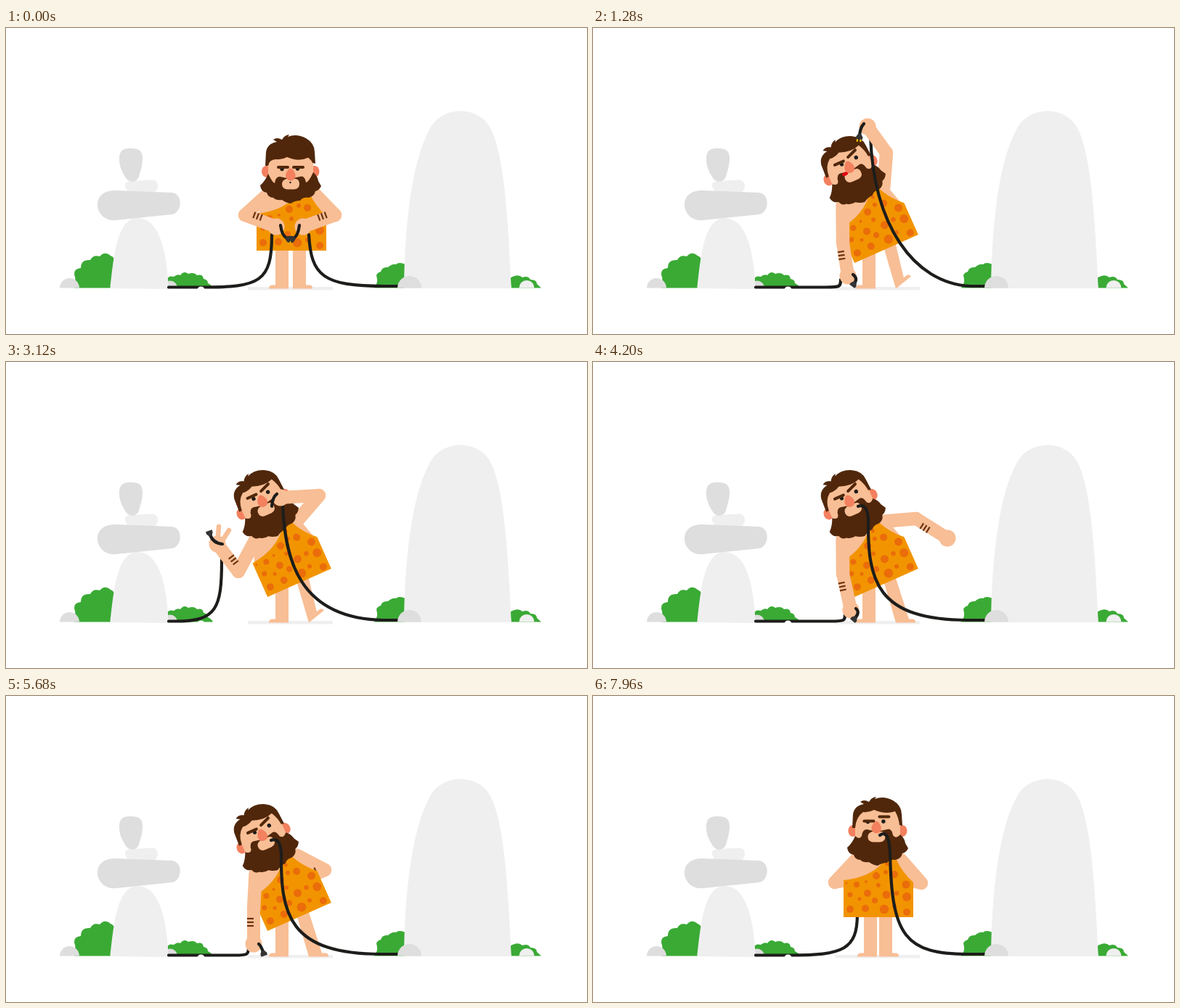
Recreate the animation shown at these times as an HTML page with a canvas. Size 800 by 422 pixels, loop 8000 ms.

```html
<!DOCTYPE html>
<html lang="en">
<head>
<meta charset="utf-8">
<title>Caveman with cables</title>
<style>
html, body { margin: 0; width: 100%; height: 100%; overflow: hidden; background: #fff; }
canvas { display: block; }
</style>
</head>
<body>
<canvas id="stage" width="800" height="422"></canvas>
<script>
const ctx = document.getElementById('stage').getContext('2d');
const SKIN = '#f8be95', HAIR = '#50270b', RED = '#f3805f', BLACK = '#1d1d1b', GREEN = '#3aaa35';
const ORANGE = '#f29400', SPOT = '#ea6c0a', LIGHT = '#efefef', GREY = '#dedede';
const LOOP = 8000;

// Drawing helpers
function shape(d, color) {
  ctx.fillStyle = color;
  ctx.fill(new Path2D(d));
}
function stroke(d, color, width, cap = 'round') {
  ctx.strokeStyle = color;
  ctx.lineWidth = width;
  ctx.lineCap = cap;
  ctx.lineJoin = 'round';
  ctx.stroke(new Path2D(d));
}
function oval(x, y, rx, ry, color) {
  ctx.fillStyle = color;
  ctx.beginPath();
  ctx.ellipse(x, y, rx, ry, 0, 0, 7);
  ctx.fill();
}
function dome(x, r, color) {
  ctx.fillStyle = color;
  ctx.beginPath();
  ctx.arc(x, 358.5, r, Math.PI, 0);
  ctx.fill();
}

// Poses. Arms: elbow, hand. Tips: quadratic curve ending in the plug.
// face: shift, left brow y, right brow inner y, outer y, eye shift.
const hold = {
  lean: 0, dip: 1, foot: 0, face: [0, 171, 171, 171, 0], tongue: 0, fingers: 0,
  L: [329, 258, 372, 274], R: [453, 258, 409, 274], lFront: 1, rFront: 1, lStripe: 1, rStripe: 1,
  lCable: [270, 350, 350, 366, 285], lTip: [378, 272, 380, 287, 387, 290],
  rCable: [417, 285, 420, 342, 437, 356], rTip: [404, 272, 402, 287, 396, 290],
  lPlug: 1, rPlug: 1, mouth: 0
};
const raise = {
  ...hold, lean: 1, dip: 0, foot: 1, face: [0, 170.5, 168, 163, 5], tongue: 1,
  L: [344, 296, 351, 342], R: [404, 172, 378, 136], lStripe: -1, rStripe: 0,
  lCable: [320, 340, 357, 341, 347], lTip: [358, 340, 365, 345, 360, 352],
  rCable: [382, 148, 386, 270, 440, 352], rTip: [373, 132, 368, 137, 367, 148]
};
const bite = {
  ...raise, tongue: 0, rPlug: 0, R: [431, 184, 378, 187],
  rCable: [381, 197, 384, 270, 402, 354], rTip: [373, 182, 367, 186, 366, 199]
};
const show = {
  ...bite, face: [0, 169.5, 168, 163, 3], L: [320, 289, 291, 251], fingers: 1,
  lCable: [234, 290, 340, 297, 273], lTip: [298, 251, 285, 250, 281, 238]
};
const fling = {
  ...bite, mouth: 1, foot: .5, R: [435, 186, 420, 141], rStripe: -.5,
  rCable: [379, 216, 378, 300, 388, 357], rTip: [365, 199, 377, 194, 379, 216]
};
const out = {
  ...fling, foot: 0, R: [445, 216, 488, 243], rStripe: 1, L: [344, 292, 355, 342],
  lCable: [326, 347, 357, 347, 347], lTip: [362, 340, 368, 345, 361, 353]
};
const hip = {
  ...out, R: [439, 240, 412, 252], rFront: 0, L: [341, 295, 341, 342],
  lCable: [315, 332, 357, 334, 347], lTip: [348, 342, 351, 344, 354, 353]
};
const stand = {
  ...hip, lean: 0, face: hold.face, L: [333, 257, 370, 250], R: [452, 258, 415, 250],
  lFront: 0, lStripe: 0, rStripe: 0, lPlug: 0,
  lCable: [270, 345, 350, 364, 300], lTip: [378, 262, 380, 268, 385, 270],
  rCable: [411, 215, 413, 330, 430, 357], rTip: [397, 192, 409, 183, 411, 215]
};
const wink = {
  ...stand, face: [-1.6, 172.5, 166.5, 166.5, 0],
  rCable: [409, 215, 411, 330, 428, 357], rTip: [395, 192, 407, 183, 409, 215]
};
const timeline = [
  [0, hold], [160, hold], [760, raise], [1400, raise], [1640, bite], [2560, bite], [2840, show],
  [3400, show], [3620, fling], [3900, out], [4340, out], [4800, hip], [5920, hip],
  [6440, stand], [7600, stand], [7760, wink], [LOOP, wink]
];

const mix = (a, b, k) => Array.isArray(a) ? a.map((v, i) => mix(v, b[i], k)) : a + (b - a) * k;
function poseAt(t) {
  const i = timeline.findIndex(key => key[0] > t);
  const [t0, a] = timeline[i - 1], [t1, b] = timeline[i];
  const u = (t - t0) / (t1 - t0), k = u * u * (3 - 2 * u);
  const pose = {};
  for (const name in a) pose[name] = mix(a[name], b[name], k);
  return pose;
}

function drawScenery() {
  shape('M94 358.5Q97 347 94 340Q93 332 103 331Q103 319 116 320Q120 312 129 315Q136 307 144 314Q150 316 155 330V358.5Z', GREEN);
  shape('M222 346Q224 341 231 343Q236 339 240 341Q245 334 251 339Q259 336 263 341Q271 339 272 346Q278 347 278 352Q283 354 285 358.5H222Z', GREEN);
  shape('M507 358.5Q512 352 511 346Q508 338 516 336Q518 329 526 330Q532 325 537 326Q541 322 550 326V358.5Z', GREEN);
  shape('M694 345Q705 338 711 344Q719 341 722 347Q731 347 731 353L737 358.5H694Z', GREEN);
  dome(87.5, 13.5, GREY);
  dome(226, 10, GREY);
  dome(717, 10.5, LIGHT);
  shape('M143.5 359C148 320 152 262 181 262C215 262 222 320 224 360Z', LIGHT);
  shape('M164 219C163 212 168 211 174 211L200 209.5C211 209 211 222 205 226H168Z', LIGHT);
  shape('M126 244C126 228 140 224 150 224L228 227C244 228 243 254 229 257L152 265C136 267 126 255 126 244Z', GREY);
  shape('M156 181C156 168 162 166 172 166C184 166 188 170 188 180C188 190 185 197 183 205C180 214 168 214 164 205C159 197 156 190 156 181Z', GREY);
  shape('M548 359C549 285 556 190 583 140C600 106 652 106 668 140C688 180 692 285 696 359Z', LIGHT);
  ctx.fillStyle = LIGHT;
  ctx.fillRect(333, 357, 117, 4.5);
}

function drawLegs(p) {
  const left = 373 - 2 * Math.max(p.lean, p.dip);
  shape(`M${left} 295h18v64.5h-27q0 -5 5 -5h4Z`, SKIN);
  const hip = 394 + p.dip + 4 * p.lean, heel = hip + 19 * p.lean, angle = -.68 * p.foot;
  const cos = Math.cos(angle), sin = Math.sin(angle);
  const at = (x, y) => `${heel + x * cos - y * sin} ${359.5 + x * sin + y * cos}`;
  shape(`M${hip} 295h18L${at(18, -5)}L${at(23, -5)}Q${at(27, -5)} ${at(27, 0)}L${at(0, 0)}Z`, SKIN);
}

const spots = [
  [390, 248, 5], [403, 243, 3], [415, 246, 5], [376, 256, 2], [363, 260, 4], [393, 261, 3],
  [431, 260, 5.5], [354, 274, 3.5], [378, 272, 5], [404, 274, 5.5], [418, 272, 3.3], [432, 277, 6],
  [367, 280, 2.5], [388, 282, 4], [415, 290, 3], [354, 294, 5], [375, 293, 5], [401, 294, 6.3],
  [432, 298, 5], [349, 258, 1.6], [405, 232, 2.5]
];
function drawTorso() {
  shape('M366 210H424L438 258H346Z', SKIN);
  const dress = 'M345 254Q385 250 404 224H417Q426 244 441 257V305H345Z';
  shape(dress, ORANGE);
  ctx.save();
  ctx.clip(new Path2D(dress));
  for (const [x, y, r] of spots) oval(x, y, r, r, SPOT);
  ctx.restore();
}

function drawHead(p) {
  const [shift, leftBrow, innerBrow, outerBrow, eyeShift] = p.face, f = 13 * p.dip;
  ctx.save();
  ctx.translate(0, 6 * p.dip);
  oval(358.5 + shift * .4, 186 + f * .3, 6.5, 8, RED);
  oval(425 - shift * .6, 186 + f * .3, 6.5, 8, RED);
  shape('M361 172Q362 150 391 150Q422 150 423 172V205H361Z', SKIN);
  // Beard with moustache, then the chin patch
  shape(`M361 193Q367 ${199 + f * .5} 370 ${193 + f}Q371 ${184 + f} 377 ${184 + f}L391 ${187 + f}
    L407 ${183.5 + f}Q412 ${184 + f} 413 ${192 + f}Q417 ${198 + f * .5} 423 191
    Q429 196 430 203L434 210Q431 216 426 217Q424 225 416 226Q409 225 405 230Q398 230 392 234
    Q385 233 380 229Q372 230 368 226Q361 226 359 219Q351 218 350 209Q357 203 361 193Z`, HAIR);
  ctx.translate(shift, f);
  shape('M386 187H399Q404 188 404 194Q404 201 397 201.5H387Q380 201 380 194Q380 189 386 187Z', SKIN);
  if (p.dip > .5) oval(391.5, 192, 1.2, 1.2, BLACK);
  if (p.tongue > .5) oval(383, 187.5, 4.5, 2.5, '#e30613');
  oval(380 + eyeShift * .8, 173.5, 2.7, 2.7, BLACK);
  oval(401.5 + eyeShift * .9, 173, 2.7, 2.7, BLACK);
  stroke(`M375 ${leftBrow}H388`, HAIR, 4);
  stroke(`M396 ${innerBrow}L409 ${outerBrow}`, HAIR, 4);
  shape('M392 172.5Q396 173 398.5 181Q399 189 392 189.5Q385 189 385 181Q388 173 392 172.5Z', RED);
  ctx.translate(-shift, -f);
  shape(`M357 182L358 163Q360 151 373 149L368 146Q373 142 380 146Q383 140 390 139L388 142
    Q400 137 413 144Q425 151 425 163L426 179L422 178Q421 ${168 + f * .5} 416 ${159 + f * .9}
    Q403 ${164 + f} 387 ${157 + f}Q380 ${161 + f} 372 ${160 + f}Q362 ${167 + f * .5} 361 182Z`, HAIR);
  ctx.restore();
}

function drawForearm([ex, ey, hx, hy], stripe) {
  stroke(`M${ex} ${ey}L${hx} ${hy}`, SKIN, 18);
  oval(hx, hy, 11.5, 11.5, SKIN);
  if (Math.abs(stripe) < .3) return;
  const len = Math.hypot(hx - ex, hy - ey), dx = (hx - ex) / len, dy = (hy - ey) / len;
  for (const along of [12, 17, 22]) {
    const x = ex + dx * along, y = ey + dy * along;
    stroke(`M${x} ${y}l${dy * 9 * stripe} ${-dx * 9 * stripe}`, '#6a3310', 2.2, 'butt');
  }
}
const drawUpper = (shoulder, arm) => stroke(`M${shoulder}L${arm[0]} ${arm[1]}`, SKIN, 18.5);

function drawTip([x0, y0, cx, cy, x, y], plug, prongs) {
  stroke(`M${x0} ${y0}Q${cx} ${cy} ${x} ${y}`, BLACK, 4.2);
  if (plug < .5) return;
  ctx.save();
  ctx.translate(x, y);
  ctx.rotate(Math.atan2(y - cy, x - cx));
  if (prongs) stroke('M4 -2H9M4 2.5H9', '#ffd500', 2, 'butt');
  shape('M-2 -2L2 -4.5H5.5V4.5H2L-2 2Z', '#333333');
  ctx.restore();
}

function render(now) {
  const p = poseAt(now % LOOP);
  const angle = -.418 * p.lean, px = 393 + 11 * p.lean, py = 305 + 2 * p.dip - .5 * p.lean;
  const inBody = draw => {
    ctx.save();
    ctx.translate(px, py);
    ctx.rotate(angle);
    ctx.translate(-393, -305);
    draw(p);
    ctx.restore();
  };
  const shoulder = x => {
    const dx = x - 393, dy = -79, c = Math.cos(angle), s = Math.sin(angle);
    return `${px + dx * c - dy * s} ${py + dx * s + dy * c}`;
  };
  const [flat, bend, rise, endX, endY] = p.lCable;
  const leftSide = () => {
    stroke(`M224 357.5H${flat}C${bend} 357.5 ${endX} ${rise} ${endX} ${endY}`, BLACK, 4.2);
    drawUpper(shoulder(362), p.L);
    drawForearm(p.L, p.lStripe);
    if (p.fingers > .05) {
      const [, , x, y] = p.L, k = p.fingers;
      stroke(`M${x} ${y}l${2 * k} ${-24 * k}M${x + 4} ${y}l${12 * k} ${-19 * k}`, SKIN, 6.5);
    }
  };
  const leftFront = p.lFront > .5, rightFront = p.rFront > .5, inMouth = p.mouth > .5;

  ctx.clearRect(0, 0, 800, 422);
  drawScenery();
  drawLegs(p);
  if (!leftFront) leftSide();
  drawUpper(shoulder(424), p.R);
  if (!rightFront) drawForearm(p.R, -p.rStripe);
  inBody(drawTorso);
  if (leftFront) leftSide();
  inBody(drawHead);

  const [sx, sy, ax, ay, bx, by] = p.rCable;
  stroke(`M${sx} ${sy}C${ax} ${ay} ${bx} ${by} 520 356H545`, BLACK, 4.2);
  if (inMouth) drawTip(p.rTip, 0);
  if (rightFront) drawForearm(p.R, -p.rStripe);
  if (!inMouth) drawTip(p.rTip, p.rPlug, true);
  if (leftFront) drawTip(p.lTip, p.lPlug);

  dome(555.5, 16.5, GREY);
  oval(268.5, 361, 5, 4.5, '#fff');
  requestAnimationFrame(() => render(performance.now()));
}
render(performance.now());
</script>
</body>
</html>
```
